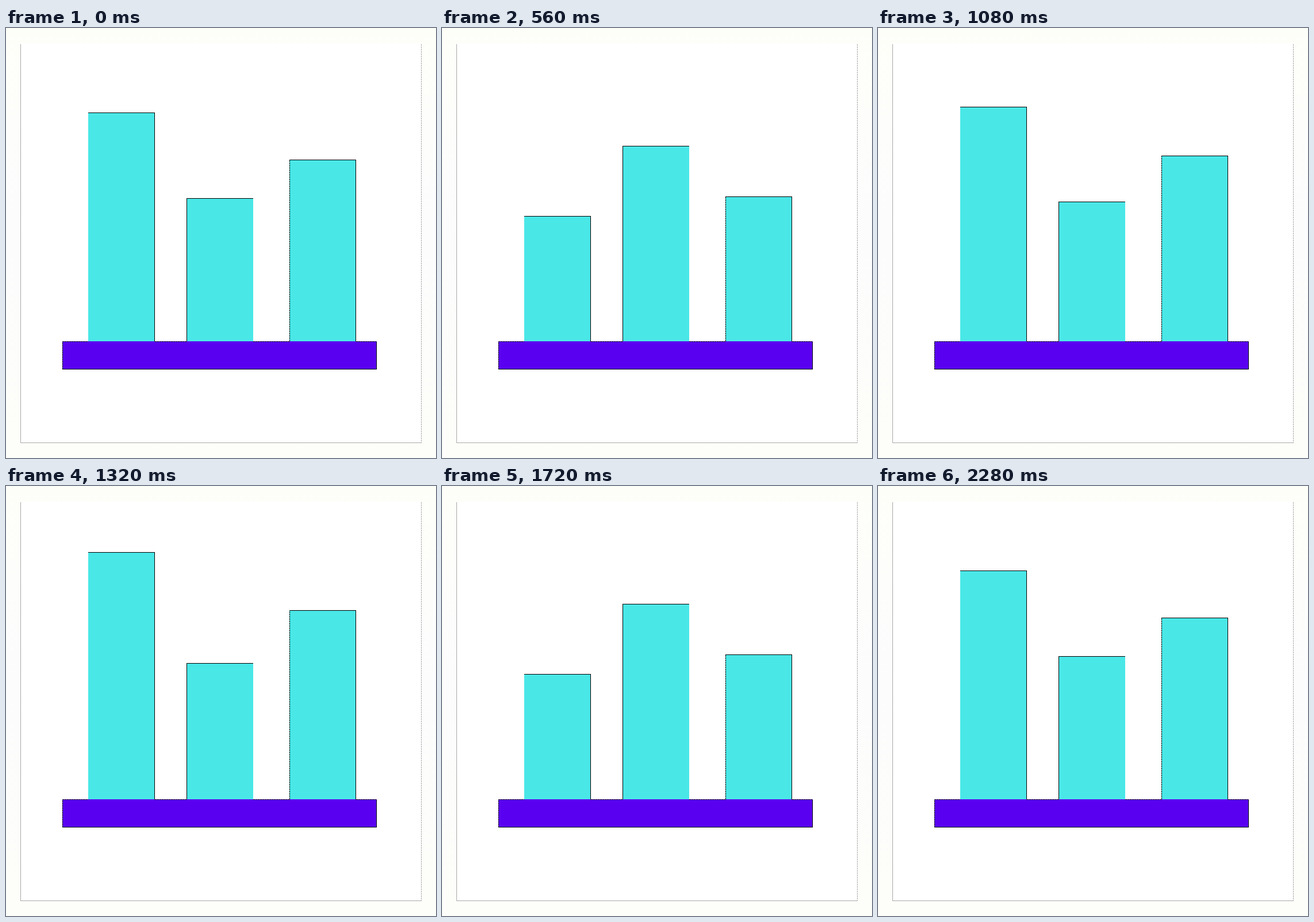
An HTML page for the animation above (2320 ms loop, 748 px wide and 748 px high).

```html
<!DOCTYPE html>
<html lang="en">
<head>
<meta charset="utf-8">
<title>Bar chart</title>
<style>
  html, body { margin: 0; width: 100%; height: 100%; overflow: hidden; }
  body { background: linear-gradient(#fefef9, #fcfcfd 45%, #fdfdf9); }
  svg { display: block; width: 100vw; height: 100vh; }
  .frame, .edge { fill: none; stroke-width: 1; }
  .frame { stroke: #a9a9a9; }
  .edge { stroke: #000; }
  .dots { stroke-dasharray: 3 1; }
  .bar { fill: #4ae7e7; }
  .base { fill: #5a00f0; }
</style>
</head>
<body>
<svg viewBox="0 0 748 748" shape-rendering="crispEdges">
  <rect x="25" y="27" width="698" height="695" fill="#fff"/>
  <path class="frame" d="M25.5 28V721.5H722.5"/>
  <path class="frame dots" d="M722.5 28V721"/>

  <rect class="base" x="98" y="545" width="547" height="49"/>
  <path class="edge" d="M99 593.5H644.5V546"/>
  <path class="edge dots" d="M98.5 594V545.5H143M259 545.5H314M430 545.5H493M609 545.5H645"/>

  <g id="bars"></g>
</svg>
<script>
const FLOOR = 545, WIDTH = 116, STEP = 40, CYCLE = 29;

// keys: [step, top of the bar]
const bars = [
  { x: 143, left: '', right: 'edge',
    keys: [[0, 147], [4, 115], [8, 223], [9, 265], [12, 340], [14.5, 326],
           [17, 340], [20, 251], [24, 112], [27, 137], [28, 147]] },
  { x: 314, left: 'edge', right: '',
    keys: [[0, 296], [4, 308], [8, 264], [9, 244], [12, 200], [14.5, 206],
           [17, 198], [20, 234], [24, 310], [27, 302], [28, 296]] },
  { x: 493, left: 'edge dots', right: 'edge',
    keys: [[0, 229], [4, 216], [8, 245], [9, 261], [12, 297], [14.5, 292],
           [17, 301], [20, 270], [24, 213], [27, 222], [28, 229]] }
];

function add(tag, cls) {
  const el = document.createElementNS('http://www.w3.org/2000/svg', tag);
  el.setAttribute('class', cls);
  document.getElementById('bars').append(el);
  return el;
}

const slope = ([t0, y0], [t1, y1]) => (y1 - y0) / (t1 - t0);

// Tangent that rests at turning points, so the curve never overshoots a key.
function tangent(keys, i) {
  if (i === 0 || i === keys.length - 1) return 0;
  const a = slope(keys[i - 1], keys[i]), b = slope(keys[i], keys[i + 1]);
  return a * b > 0 ? 2 * a * b / (a + b) : 0;
}

function topAt(keys, t) {
  let i = 0;
  while (i < keys.length - 2 && t >= keys[i + 1][0]) i++;
  const [t0, y0] = keys[i], [t1, y1] = keys[i + 1];
  const span = t1 - t0, u = (t - t0) / span, v = 1 - u;
  return y0 * (1 + 2 * u) * v * v + y1 * u * u * (3 - 2 * u)
    + span * u * v * (v * tangent(keys, i) - u * tangent(keys, i + 1));
}

for (const bar of bars) {
  bar.body = add('rect', 'bar');
  bar.body.setAttribute('x', bar.x);
  bar.body.setAttribute('width', WIDTH);
  bar.lid = add('path', 'edge');
  bar.sides = [[bar.left, bar.x + 0.5], [bar.right, bar.x + WIDTH - 0.5]]
    .filter(([cls]) => cls)
    .map(([cls, x]) => ({ x, el: add('path', cls) }));
}

function draw() {
  const step = Math.floor(performance.now() / STEP) % CYCLE;
  for (const { x, keys, body, lid, sides } of bars) {
    const top = Math.round(topAt(keys, step));
    body.setAttribute('y', top);
    body.setAttribute('height', FLOOR - top);
    lid.setAttribute('d', `M${x} ${top + 0.5}h${WIDTH}`);
    for (const side of sides) side.el.setAttribute('d', `M${side.x} ${FLOOR}V${top}`);
  }
  requestAnimationFrame(draw);
}
draw();
</script>
</body>
</html>
```
